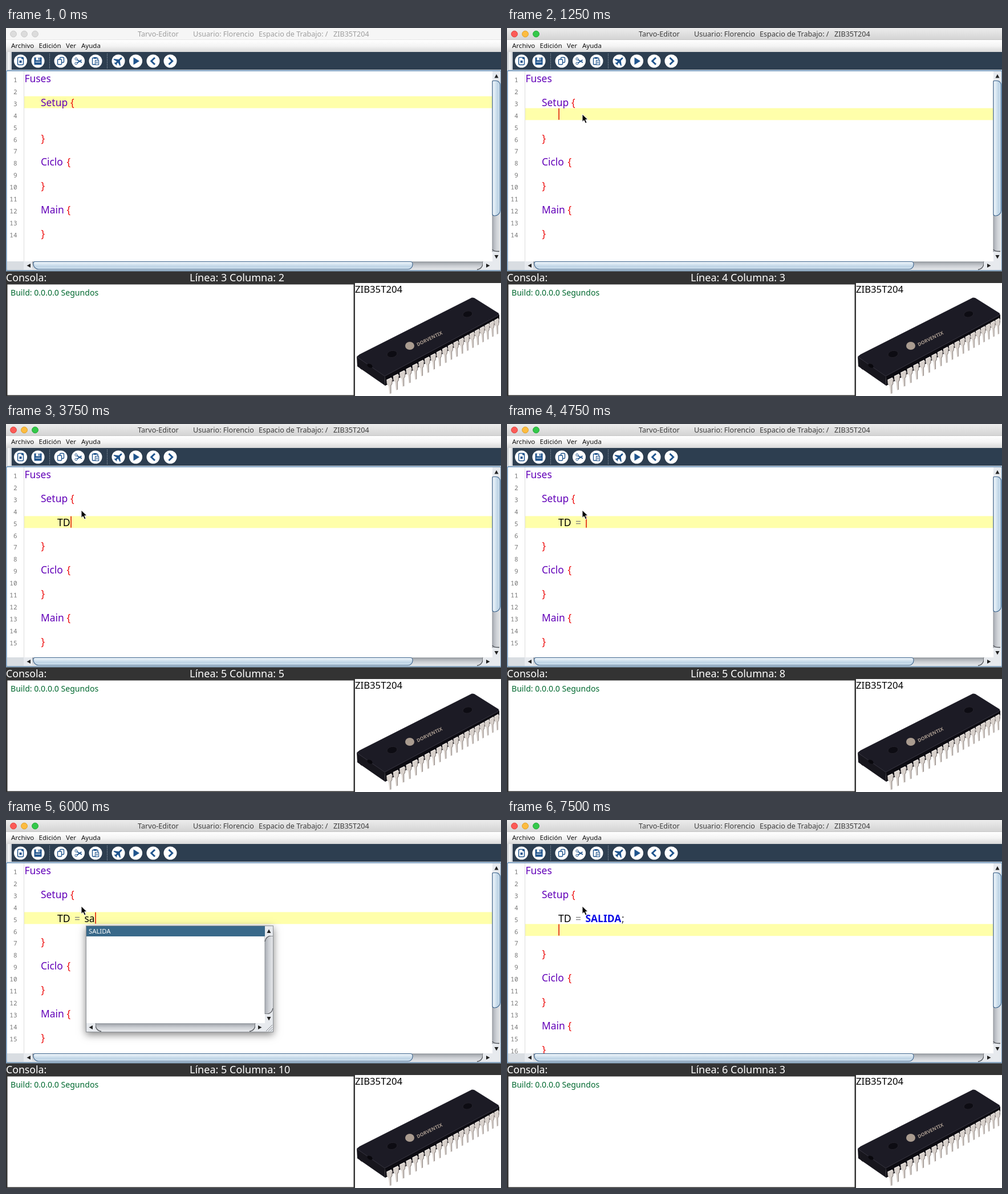
Write an HTML page with a canvas that moves like this. It is 868 px wide and 645 px high and loops after 8 s.

```html
<!DOCTYPE html>
<html lang="es">
<head>
<meta charset="utf-8">
<title>Editor</title>
<style>
html, body { margin: 0; width: 100%; height: 100%; overflow: hidden; background: #fff; }
canvas { display: block; width: 868px; height: 645px; }
</style>
</head>
<body>
<canvas id="stage" width="868" height="645"></canvas>
<script>
const g = document.getElementById('stage').getContext('2d');
const LOOP = 8000, BLINK = 500;
const ROW = 20.9, ROW_TOP = 77.8;
const SANS = '"Noto Sans", "Open Sans", sans-serif';
const MONO = '"Noto Sans Mono", "DejaVu Sans Mono", monospace';
const ICON = '#1f548d', VIOLET = '#6200b8', RED = '#ee1111';

// start time, line, column, caret x
const STEPS = [
  [0, 3, 2, null], [1250, 4, 3, 90], [2500, 5, 3, 90], [3250, 5, 4, 101],
  [3750, 5, 5, 113], [4000, 5, 6, 119], [4250, 5, 7, 132], [4750, 5, 8, 138],
  [6000, 5, 10, 156], [6500, 5, 14, 201], [7000, 5, 15, 206.5], [7500, 6, 3, 90]
];
// start time, pointer x, pointer y
const POINTER = [[250, 454, 133], [500, 405, 152], [750, 183, 163], [1000, 131.5, 152], [1250, 131.5, 151]];
// line, word, brace, brace x
const CODE = [[1, 'Fuses'], [3, 'Setup', '{', 113], [6, '', '}', 61.5], [8, 'Ciclo', '{', 106.5],
  [10, '', '}', 61.5], [12, 'Main', '{', 106.5], [14, '', '}', 61.5]];

const latest = (list, t) => list.filter(s => s[0] <= t).pop();

function rect(x, y, w, h, fill) {
  g.fillStyle = fill;
  g.fillRect(x, y, w, h);
}

function text(str, x, y, size, color, font = SANS, weight = 400) {
  g.font = `${weight} ${size}px ${font}`;
  g.fillStyle = color;
  g.fillText(str, x, y);
}

function blend(x0, y0, x1, y1, ...colors) {
  const grad = g.createLinearGradient(x0, y0, x1, y1);
  colors.forEach((c, i) => grad.addColorStop(i / (colors.length - 1), c));
  return grad;
}

function paint(fill, stroke, width = 1) {
  if (fill) { g.fillStyle = fill; g.fill(); }
  if (stroke) { g.strokeStyle = stroke; g.lineWidth = width; g.stroke(); }
}

function poly(points, fill, stroke, width = 1) {
  g.beginPath();
  points.forEach(([x, y]) => g.lineTo(x, y));
  g.closePath();
  paint(fill, stroke, width);
}

function ellipse(x, y, rx, ry, fill, stroke, angle = 0) {
  g.beginPath();
  g.ellipse(x, y, rx, ry, angle, 0, Math.PI * 2);
  paint(fill, stroke);
}

function round(x, y, w, h, radii, fill, stroke, width = 1) {
  g.beginPath();
  g.roundRect(x, y, w, h, radii);
  paint(fill, stroke, width);
}

function line(points, color, width) {
  g.beginPath();
  points.forEach(([x, y]) => g.lineTo(x, y));
  paint(null, color, width);
}

function at(x, y, angle, draw) {
  g.save();
  g.translate(x, y);
  g.rotate(angle);
  draw();
  g.restore();
}

function arrow(x, y, turns) {
  at(x, y, turns * Math.PI / 2, () => poly([[0, -3.5], [3.5, 3], [-3.5, 3]], '#222'));
}

function header(active) {
  rect(0, 0, 868, 21, active ? blend(0, 0, 0, 21, '#ececec', '#d3d3d3') : '#f6f6f6');
  rect(0, 20.5, 868, 1, active ? '#b9b9b9' : '#dadada');
  const fills = active ? ['#fc5b57', '#fdbc40', '#34c84a'] : ['#dcdcdc', '#dcdcdc', '#dcdcdc'];
  const rims = active ? ['#e0443e', '#dfa023', '#1fa833'] : ['#c9c9c9', '#c9c9c9', '#c9c9c9'];
  fills.forEach((c, i) => ellipse(13 + 19 * i, 10.5, 5.4, 5.4, c, rims[i]));
  const ink = active ? '#3c3c3c' : '#9e9e9e';
  [['Tarvo-Editor', 231], ['Usuario: Florencio', 328], ['Espacio de Trabajo: /', 443], ['ZIB35T204', 574]]
    .forEach(([s, x]) => text(s, x, 15, 12.6, ink));

  rect(0, 21, 868, 21, blend(0, 21, 0, 42, '#ffffff', '#f4f4f4', '#d8d8d8'));
  [['Archivo', 9], ['Edición', 57.5], ['Ver', 105], ['Ayuda', 132]]
    .forEach(([s, x]) => text(s, x, 35, 11.5, '#111'));
}

function toolbar() {
  rect(0, 42, 868, 31, '#2d3e50');
  rect(0, 42, 10, 31, blend(0, 0, 10, 0, '#bfc3c8', '#fafafa', '#c6cad0'));
  for (const x of [76, 177])
    for (let y = 45; y < 71; y += 3) rect(x, y, 1, 1.4, '#9aa5b0');

  const icons = [
    [25.5, () => {
      round(-5, -6.5, 10, 13, 2, null, ICON, 1.5);
      rect(-2, -1, 4, 4, ICON);
      rect(1.5, -6.5, 3.5, 3, ICON);
    }],
    [56, () => {
      round(-6.5, -6.5, 13, 13, 1, ICON);
      rect(-3.5, -6.5, 7, 5, '#fff');
      rect(0.8, -5.8, 1.8, 3.4, ICON);
      rect(-4.5, 1.2, 9, 1.1, '#fff');
    }],
    [96, () => {
      round(-1.5, -6.5, 7, 9, 1.5, '#fff', ICON, 1.4);
      round(-5.5, -3, 7, 9, 1.5, '#fff', ICON, 1.4);
    }],
    [126.5, () => {
      line([[-3, -3], [6.5, 2.5]], ICON, 1.7);
      line([[-3, 4], [6, -2]], ICON, 1.7);
      ellipse(-3.6, -3.8, 2, 2, '#fff', ICON);
      ellipse(-3.6, 4, 2, 2, '#fff', ICON);
    }],
    [157, () => {
      round(-5.5, -5.5, 9.5, 11.5, 1, null, ICON, 1.4);
      rect(-3.2, -7, 5, 3, ICON);
      round(-0.5, -1.5, 6, 8, 0.5, '#fff', ICON, 1.2);
      rect(1, 1, 3, 1, ICON);
      rect(1, 3.2, 3, 1, ICON);
    }],
    [197, () => at(0, 0, Math.PI / 4, () => {
      round(-1.4, -8.5, 2.8, 16, 1.4, ICON);
      poly([[0, -3.5], [8, 2.5], [8, 4], [0, 2], [-8, 4], [-8, 2.5]], ICON);
      poly([[0, 4], [3.5, 7.5], [-3.5, 7.5]], ICON);
    })],
    [227.5, () => poly([[-4, -6.5], [6.5, 0], [-4, 6.5]], ICON)],
    [258, () => line([[3, -6], [-3.2, 0], [3, 6]], ICON, 3)],
    [288, () => line([[-2.5, -6], [3.7, 0], [-2.5, 6]], ICON, 3)]
  ];
  for (const [x, draw] of icons) {
    ellipse(x, 58, 11.5, 11.5, '#fff');
    at(x, 58, 0, draw);
  }
}

function vTrack(x, y, w, h) {
  rect(x, y, w, h, blend(x, 0, x + w, 0, '#a9adb4', '#ced1d6', '#e4e6e9'));
  line([[x, y], [x, y + h]], '#8c9096', 1);
}

function hTrack(x, y, w, h) {
  rect(x, y, w, h, blend(0, y, 0, y + h, '#a0a4aa', '#cbced3', '#e6e8eb'));
  line([[x, y], [x + w, y]], '#85898f', 1);
}

// curved lip where a track meets its arrow button
function lip(x, y, turns, flip = 1) {
  at(x, y, turns * Math.PI / 2, () => {
    g.scale(1, flip);
    g.beginPath();
    g.moveTo(0, -7);
    g.quadraticCurveTo(1, 5, -10, 7);
    g.lineTo(0, 7);
    g.closePath();
    paint('#e9ebee');
    g.beginPath();
    g.moveTo(0, -7);
    g.quadraticCurveTo(1, 5, -10, 7);
    paint(null, '#55585d', 1.3);
  });
}

function editorFrame() {
  rect(0, 73, 868, 354, '#cfd6de');
  round(0.8, 74.8, 867, 350.6, 2, '#fff', '#7399bd', 1.7);
  rect(31, 76, 1, 333, '#dcdcdc');
}

function editorBars() {
  const shine = ['#f6fafd', '#d9e7f2', '#bdd3e5', '#dceaf4'];
  rect(853, 76, 14, 333, '#e7eaee');
  vTrack(853, 92, 14, 301);
  round(853, 92.5, 13.3, 236.5, [2, 7, 9, 3], blend(853, 0, 867, 0, ...shine), '#3b638c', 1.1);
  rect(853, 392, 14, 17, '#e7eaee');
  g.beginPath();
  g.moveTo(853, 388);
  g.quadraticCurveTo(855, 392, 865, 391.5);
  paint(null, '#505359', 1.4);
  arrow(860, 84.5, 0);
  arrow(860, 401, 2);

  rect(2, 409, 865, 15, '#e7eaee');
  rect(2, 409, 29, 15, '#d9dde2');
  hTrack(46, 410, 790, 14);
  round(48, 409.5, 665, 13.2, [3, 4, 8, 9], blend(0, 409, 0, 423, ...shine), '#3b638c', 1.1);
  lip(836, 416.5, 0);
  rect(836, 410, 31, 14, '#e7eaee');
  arrow(40, 416.5, 3);
  arrow(845, 416.5, 1);
  rect(0, 424.5, 868, 2, '#7f9db9');
}

function editor(row, col, caret) {
  const extra = Math.max(0, row - 4);
  const typed = row === 6 ? 15 : row === 5 ? col : 0;
  const base = n => ROW_TOP + (n - 1) * ROW + 17.2;
  g.save();
  g.beginPath();
  g.rect(2, 76, 851, 333);
  g.clip();
  const top = ROW_TOP + (row - 1) * ROW;
  rect(32, top, 821, ROW, '#ffffaa');

  g.textAlign = 'right';
  for (let n = 1; n <= 14 + extra; n++) text(n, 19.5, base(n), 11, '#777', MONO);
  g.textAlign = 'left';

  for (const [n, word, brace, x] of CODE) {
    const y = base(n > 5 ? n + extra : n);
    text(word, n === 1 ? 32.5 : 61, y, 17.4, VIOLET);
    if (brace) text(brace, x, y, 17.4, RED);
  }

  const y = base(5);
  if (typed > 3) text(typed > 4 ? 'TD' : 'T', 90, y, 17.6, '#000');
  if (typed > 6) text('=', 120, y, 17.4, '#808080');
  if (typed === 10) text('sa', 137.5, y, 17.4, '#000');
  if (typed > 13) text('SALIDA', 137.5, y, 17.4, '#0a0ae6', SANS, 700);
  if (typed > 14) text(';', 201, y, 17.4, '#333');
  if (caret !== null) rect(caret + 0.2, top + 0.3, 1.7, 20, '#e22a12');
  g.restore();
}

function popup() {
  g.save();
  g.shadowColor = 'rgba(0,0,0,.5)';
  g.shadowBlur = 13;
  g.shadowOffsetY = 4;
  rect(140, 185, 329, 187, '#fff');
  g.restore();
  g.strokeStyle = '#8e9297';
  g.lineWidth = 1;
  g.strokeRect(140.5, 185.5, 328, 186);
  rect(141, 186, 313, 18, '#39698a');
  text('SALIDA', 145, 199, 11.3, '#fff');

  rect(454, 186, 14, 170, '#e7eaee');
  vTrack(454, 203, 14, 137);
  lip(461, 203, 3, -1);
  rect(454, 186, 14, 17, '#e7eaee');
  lip(461, 340, 1, -1);
  rect(454, 340, 14, 16, '#e7eaee');
  arrow(461, 195, 0);
  arrow(461, 348, 2);

  rect(141, 356, 327, 15, '#e7eaee');
  hTrack(157, 357, 280, 13);
  lip(157, 363.5, 2, -1);
  rect(141, 357, 16, 13, '#e7eaee');
  lip(437, 363.5, 0);
  rect(437, 357, 17, 13, '#e7eaee');
  arrow(149, 363.5, 3);
  arrow(445, 363.5, 1);
  for (const d of [3, 7, 11]) line([[467 - d, 370], [467, 370 - d]], '#85898f', 1);
}

function consolePane(row, col) {
  rect(0, 426.5, 868, 21, '#333');
  text('Consola:', 0, 443.5, 17.7, '#fff');
  text(`Línea: ${row} Columna: ${col}`, 322, 443.5, 18.05, '#fff');
  rect(0, 447, 612, 198, '#333');
  rect(2.5, 449.5, 607, 194, '#fff');
  text('Build: 0.0.0.0 Segundos', 8, 469.4, 14.1, '#00692f');
  rect(612, 447, 256, 198, '#fff');
  text('ZIB35T204', 612, 464, 16.7, '#000');
}

function chip() {
  poly([[620, 590], [624, 591], [624, 599], [621, 597]], '#4a4648');
  poly([[615, 576], [664, 609], [665, 627], [616, 593]], '#17161d');
  poly([[664, 609], [865, 502], [865, 516], [665, 627]], '#0c0b11');
  poly([[615, 576], [620, 572], [817, 472.5], [821, 473], [864, 500], [864, 504], [664, 611]], '#1c1b25');
  line([[616, 577], [664, 610], [864, 503]], '#34323d', 1);
  ellipse(638, 592, 5, 3, '#09080d', null, 0.5);
  ellipse(677, 571.5, 9, 6, '#0d0c13', '#25232c', -0.2);
  ellipse(809.5, 501.5, 8.5, 5.5, '#0d0c13', '#25232c', -0.2);
  ellipse(708, 557, 8, 7, '#aa9c90');
  at(722, 558, -0.46, () => text('DORVENTIX', 0, 0, 8.4, '#aa9c90', SANS, 600));

  // pins crowd together towards the far end
  for (let i = 19; i >= 0; i--) {
    const run = 11.6 * i - 0.09 * i * i;
    at(672.5 + run, 614.5 - run * 0.555, 0, () => {
      g.scale(1.06 - i * 0.01, 1);
      poly([[-5, 2], [3, -2], [5, 1], [4.5, 9], [2.5, 12], [2.5, 26], [0, 27], [-1.5, 13], [-4.5, 9]], '#d8d1cc');
      line([[4.3, 2], [4, 9], [2.2, 12], [2.2, 26]], '#8d8480', 1.1);
      line([[-4.5, 2.5], [3, -1.2]], '#f2eeea', 1);
    });
  }
}

function pointer(x, y) {
  at(x, y, 0, () => poly([[0.5, 0], [0.5, 13.5], [3.6, 10.7], [6, 16], [8.5, 14.9], [6.2, 9.8], [10.4, 9.6]],
    '#000', '#fff', 1));
}

function draw(t) {
  const [since, row, col, x] = latest(STEPS, t);
  const lit = Math.floor((t - since) / BLINK) % 2 === 0;
  const mouse = latest(POINTER, t);
  g.clearRect(0, 0, 868, 645);
  header(t >= 1250);
  toolbar();
  editorFrame();
  editor(row, col, lit ? x : null);
  editorBars();
  consolePane(row, col);
  chip();
  if (t >= 5250 && t < 6500) popup();
  if (mouse) pointer(mouse[1], mouse[2]);
}

const start = performance.now();
function tick() {
  draw((performance.now() - start) % LOOP);
  requestAnimationFrame(tick);
}
tick();
</script>
</body>
</html>
```
